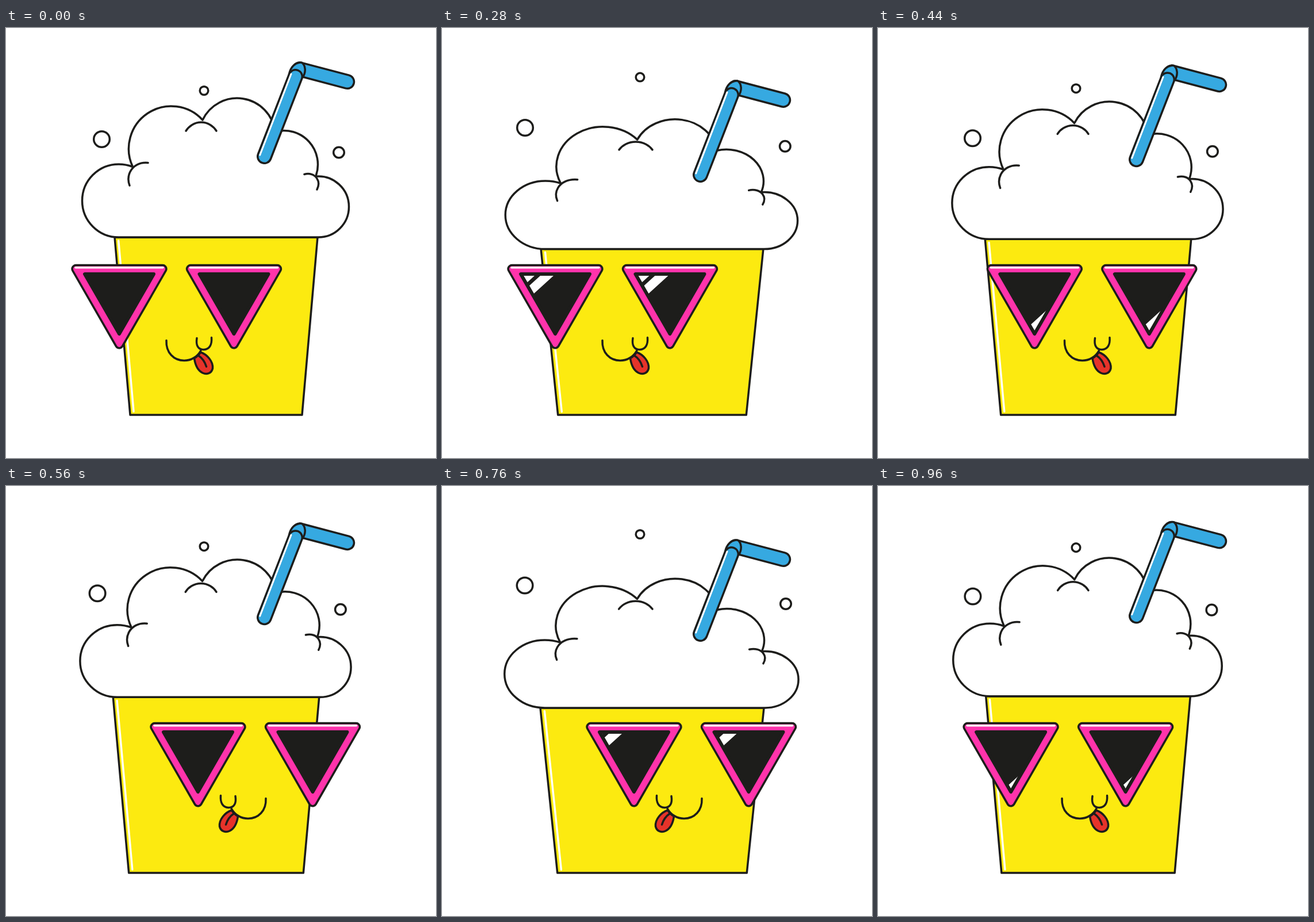
An HTML page that plays this animation: 748 px wide and 748 px high, repeating every 1000 ms.

```html
<!DOCTYPE html>
<html lang="en">
<head>
<meta charset="utf-8">
<title>Cool drink</title>
<style>
  html, body { margin: 0; height: 100%; overflow: hidden; background: #fff; }
  svg { display: block; width: 100%; height: 100%; }
  .ink { stroke: #1d1d1b; stroke-width: 3.5; stroke-linecap: round; stroke-linejoin: round; fill: none; }
  .ink * { vector-effect: non-scaling-stroke; }
  .shine { stroke: #fff; }
  .fat { stroke-width: 27; }
  .blue { stroke: #36a9e1; stroke-width: 20; }
</style>
</head>
<body>
<svg viewBox="0 0 748 748">
  <defs>
    <clipPath id="lensClip"><path d="M137 428H257L197 532Z"/></clipPath>
    <g id="lens" class="ink">
      <path d="M121.5 419H272.5L197 550.3Z" stroke-width="16.4"/>
      <path d="M121.5 419H272.5L197 550.3Z" style="stroke:#ff33ab;stroke-width:9.2;fill:#ff33ab"/>
      <path class="shine" d="M121 416.8H273"/>
      <path d="M137 428H257L197 532Z" fill="#1d1d1b"/>
      <g clip-path="url(#lensClip)">
        <path id="glint" stroke="none" fill="#fff"
          d="M11 420h24l-132 120h-24zM45 420h23l-132 120h-23z"/>
      </g>
      <path d="M137 428H257L197 532Z" style="stroke-width:6"/>
    </g>
  </defs>

  <g class="ink">
    <circle id="bubbleL" cx="166.5" cy="193.5" r="13.8"/>
    <circle id="bubbleM" cx="344.5" cy="109" r="7.3"/>
    <circle id="bubbleR" cx="579" cy="216.5" r="9.3"/>
  </g>

  <g id="cup" class="ink">
    <path fill="#fcea10" d="M189 364H542L515 673H216Z"/>
    <path class="shine" d="M195.7 370L222 667"/>
    <path fill="#fff" d="M196 364A63.5 63.5 0 0 1 196 237Q209 237 220.5 241.5A74 74 0 0 1 342 160
      A66.5 66.5 0 0 1 468 180.5A59 59 0 0 1 538.7 258.2A53 53 0 0 1 596.5 311A53 53 0 0 1 543.5 364Z"/>
    <path d="M247 234.5C232 233 221 240 216 250C212 258 212 266 215 274"/>
    <path d="M313 179A31 31 0 0 1 366 179"/>
    <path d="M519 254.5C528 252 537 255 541 262C545 268 544 275 541 281"/>
  </g>

  <g id="straw" class="ink">
    <path class="fat" d="M511 71.7L593.7 93.5"/>
    <path class="blue" d="M511 71.7L593.7 93.5"/>
    <path style="fill:#36a9e1" d="M492.5 80C495 68 503 59 514.5 60.2C521 65 522.5 76 516 86Z"/>
    <path class="fat" d="M449.5 223.5L503.5 84.5"/>
    <path class="blue" d="M449.5 223.5L503.5 84.5"/>
    <path class="shine" style="stroke-width:3" d="M441.7 221L496 80"/>
  </g>

  <g id="mouth" class="ink">
    <path fill="#e6332a" d="M338.5 564C350 568 360.5 580 359.5 592C357.5 601 349 603.5 342 600C333 595.5 329 585 327.5 574.5Q334 571 338.5 564Z"/>
    <path d="M335 570C341 574 346 581 348.5 589"/>
    <path d="M279 543.5C278 565 292 578.5 310 578.5C322 578.5 333 572 339 561"/>
    <path d="M332 539.5C330 552 334 559.5 344 559.5C354 559 358.5 551 357.5 538.5"/>
  </g>

  <g id="glasses">
    <use href="#lens"/>
    <use href="#lens" x="199.5"/>
  </g>
</svg>
<script>
const MID = 365.5, BASE = 673, STEP = 40, COUNT = 25;
const set = (id, value) => document.getElementById(id).setAttribute("transform", value);
const move = (id, x, y = 0) => set(id, `translate(${x} ${y})`);

// Eased value between [time, value] keys
function ease(keys, t) {
  const n = keys.findIndex(k => k[0] > t);
  const [t0, a] = keys[n - 1], [t1, b] = keys[n];
  const p = (t - t0) / (t1 - t0);
  return a + (b - a) * p * p * (3 - 2 * p);
}

const squashKeys = [[0, 0], [6, 1], [12.5, 0.02], [19, 1], [25, 0]];
const bubbleKeys = [[0, 0], [5.8, 1], [6.5, 1], [12, 0], [17.2, 1], [18.8, 1], [25, 0]];
const glassesKeys = [[0, 0], [9.4, 0], [12.4, 137], [21.93, 137], [25, 0]];
const mouthKeys = [[0, 0], [9.6, 0], [12.4, 91], [22.86, 91], [25, 0]];

function draw(now) {
  const t = Math.floor(now / STEP) % COUNT;
  const s = ease(squashKeys, t), b = ease(bubbleKeys, t);

  set("cup", `translate(${MID} ${BASE}) scale(${1 + 0.102 * s} ${1 - 0.071 * s}) translate(${-MID} ${-BASE})`);
  move("straw", 0, 34 * s);
  move("bubbleL", -22.5 * b, -20.5 * b);
  move("bubbleM", 0, -25 * s);
  move("bubbleR", 19 * s, -11.5 * s);

  move("glasses", ease(glassesKeys, t));
  move("glint", t < 14 ? 138 + 36.75 * (t - 7) : 120 + 34.4 * (t - 19));

  // The mouth mirrors once it passes the middle
  const m = ease(mouthKeys, t);
  if (m > 45.5) set("mouth", `translate(${640 + m} 0) scale(-1 1)`);
  else move("mouth", m);

  requestAnimationFrame(draw);
}
draw(0);
</script>
</body>
</html>
```
